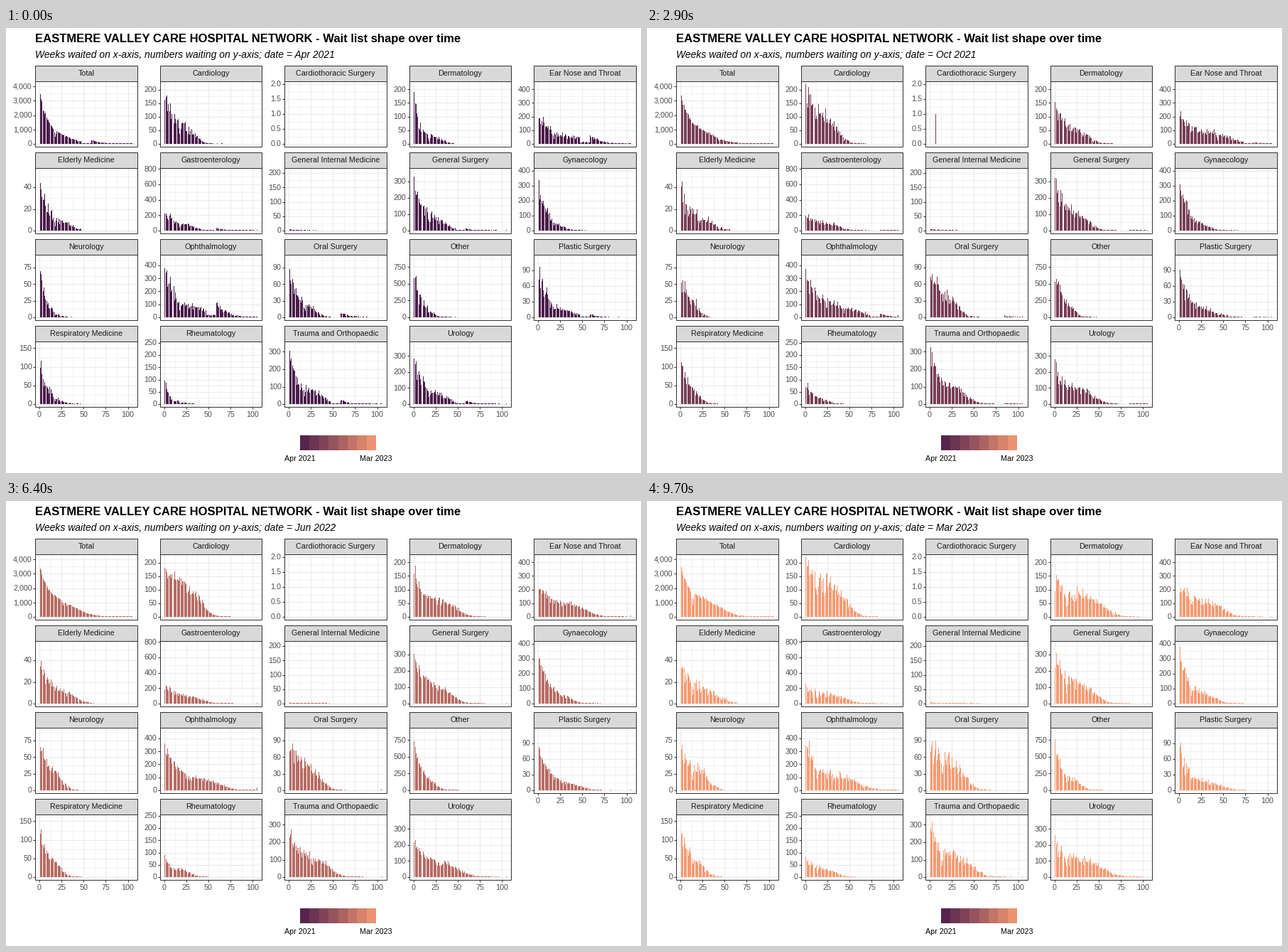
Animation, 894 px wide and 626 px high, one loop 10000 ms. Source, as a matplotlib script:

```python
import numpy as np
import matplotlib.pyplot as plt
from matplotlib.animation import FuncAnimation
from matplotlib.collections import LineCollection, PolyCollection
from matplotlib.patches import Rectangle

W, H, DPI = 894, 626, 100
PX = 72 / DPI
plt.rcParams["font.family"] = "Liberation Sans"

TITLE = "EASTMERE VALLEY CARE HOSPITAL NETWORK - Wait list shape over time"
SUBTITLE = "Weeks waited on x-axis, numbers waiting on y-axis; date = "
NAMES = "Jan Feb Mar Apr May Jun Jul Aug Sep Oct Nov Dec".split()
LAST = 23
MONTHS = [f"{NAMES[(m + 3) % 12]} {2021 + (m + 3) // 12}" for m in range(LAST + 1)]
# First frame at which each month stands still; the frame before is halfway.
STARTS = [0, 6, 11, 16] + list(range(21, 98, 4))

DARK, LIGHT = np.array([75, 29, 75]) / 255, np.array([246, 155, 115]) / 255
INK, AXIS_TEXT, STRIP, GRID = "#333333", "#4d4d4d", "#d9d9d9", "#ebebeb"

WEEKS = np.arange(1, 106)
WEEKS_PER_MONTH = 52.18 / 12
LOCKDOWN = 59  # weeks before the first month
rng = np.random.default_rng(11)
panels = []


def blend(t):
    return DARK + (LIGHT - DARK) * t


def referrals(age):
    """Relative referrals by age at the first month: noise, holidays, lockdown."""
    f = 1 + 0.15 * rng.standard_normal(age.size)
    for year in range(3):
        f *= 1 - 0.5 * np.exp(-((age - 18 + 52 * year) / 1.1) ** 2)
    f[(age > LOCKDOWN - 12) & (age < LOCKDOWN)] *= 0.35
    return np.clip(f, 0.1, None)


def waiting(peak, scale, share, limit, backlog):
    """A fast-treated part that decays, and a share that waits up to a limit."""
    age = np.arange(-105, 210)
    factor = referrals(age)
    old = np.where(age >= LOCKDOWN, np.exp((LOCKDOWN - age) / 10), 0)
    counts = np.zeros((LAST + 1, WEEKS.size))
    for t in range(LAST + 1):
        long = share[0] + (share[1] - share[0]) * np.sqrt(t / LAST)
        end = limit[0] + (limit[1] - limit[0]) * t / LAST
        quick = (1 - long) * np.exp(-(WEEKS - 1) / scale)
        slow = long / (1 + np.exp((WEEKS - end) * 7 / end))
        shift = round(WEEKS_PER_MONTH * t)
        left = peak * backlog * np.exp(-t / 5) * old
        v = peak * (quick + slow) + np.interp(WEEKS - shift, age, left)
        v *= np.interp(WEEKS - shift, age, factor)
        v += 0.4 * np.sqrt(v) * rng.standard_normal(WEEKS.size)
        v[-1] += left[age + shift > 105].sum() / 2
        counts[t] = np.clip(np.round(v), 0, None)
    return counts


def panel(name, ymax, step, peak=0, scale=1, share=(0, 0), limit=(1, 1), backlog=0):
    panels.append((name, ymax, step, waiting(peak, scale, share, limit, backlog)))


panel("Total", 4143, 1000)
panel("Cardiology", 220, 50, 180, 9, (0.35, 0.72), (35, 45))
panel("Cardiothoracic Surgery", 2, 0.5)
panel("Dermatology", 218.5, 50, 165, 6, (0.14, 0.48), (34, 55))
panel("Ear Nose and Throat", 437, 100, 225, 10, (0.22, 0.5), (62, 50), 0.12)
panel("Elderly Medicine", 55, 20, 40, 9, (0.18, 0.3), (36, 44))
panel("Gastroenterology", 775, 200, 230, 10, (0.3, 0.48), (36, 48), 0.14)
panel("General Internal Medicine", 207, 50, 4, 12, (0.1, 0.4), (20, 45))
panel("General Surgery", 364, 100, 280, 10, (0.22, 0.42), (38, 46), 0.04)
panel("Gynaecology", 398, 100, 310, 9, (0.06, 0.2), (30, 42))
panel("Neurology", 90, 25, 68, 6, (0.1, 0.5), (18, 32))
panel("Ophthalmology", 459, 100, 330, 12, (0.18, 0.3), (62, 62), 0.22)
panel("Oral Surgery", 108, 30, 82, 9, (0.22, 0.6), (30, 40), 0.1)
panel("Other", 891, 250, 720, 6, (0.15, 0.24), (22, 30))
panel("Plastic Surgery", 114, 30, 78, 11, (0.13, 0.16), (46, 50), 0.05)
panel("Respiratory Medicine", 160, 50, 112, 8, (0.1, 0.35), (22, 28))
panel("Rheumatology", 243, 50, 78, 6, (0.08, 0.45), (24, 35))
panel("Trauma and Orthopaedic", 342, 100, 285, 7, (0.26, 0.44), (40, 48), 0.07)
panel("Urology", 371, 100, 230, 9, (0.25, 0.46), (42, 56), 0.07)

# Rare cardiothoracic patients grow a month older each step until treated.
heart = panels[2][3]
for count, first, last in ((2, 2, 3), (1, 5, 12)):
    for t in range(first, last + 1):
        heart[t, round(2 + WEEKS_PER_MONTH * (t - first))] = count
panels[0][3][:] = sum(p[3] for p in panels[1:])

fig = plt.figure(figsize=(W / DPI, H / DPI), dpi=DPI, facecolor="white")
ax = fig.add_axes([0, 0, 1, 1])
ax.set(xlim=(0, W), ylim=(H, 0))
ax.axis("off")

PANEL_W, PANEL_H, STRIP_H = 143.7, 92.2, 22.2
UNIT_X, UNIT_Y = PANEL_W / 115.39, PANEL_H / 1.1


def label(x, y, text, size=10.7, color=AXIS_TEXT, ha="center", **kw):
    return ax.text(x, y, text, fontsize=size * PX, color=color, ha=ha,
                   va="baseline", **kw)


def lines(segments, color, width, z):
    ax.add_collection(LineCollection(segments, colors=color,
                                     linewidths=width * PX, zorder=z))


def box(x, y, w, h, face):
    ax.add_patch(Rectangle((x, y), w, h, facecolor=face, edgecolor=INK,
                           linewidth=PX, zorder=4))


major, minor, ticks = [], [], []
bar_left, bar_base, bar_height = [], [], []
for i, (name, ymax, step, data) in enumerate(panels):
    row, col = divmod(i, 5)
    left, strip_top = 41.2 + 175.5 * col, 52.8 + 122 * row
    top = strip_top + STRIP_H
    right, bottom = left + PANEL_W, top + PANEL_H
    zero_x, zero_y = left + 4.695 * UNIT_X, bottom - UNIT_Y * 0.05
    box(left, strip_top, PANEL_W, STRIP_H, STRIP)
    box(left, top, PANEL_W, PANEL_H, "none")
    label((left + right) / 2, strip_top + 14.6, name, 10.75, "#1a1a1a", zorder=5)

    for n, v in enumerate(np.arange(0, ymax * 1.05, step / 2)):
        y = zero_y - v / ymax * UNIT_Y
        (minor if n % 2 else major).append([(left, y), (right, y)])
        if n % 2 == 0:
            ticks.append([(left - 3, y), (left, y)])
            text = f"{v:.1f}" if step < 1 else f"{v:,.0f}"
            label(left - 4.6, y + 3.3, text, ha="right")

    for n, v in enumerate(np.arange(0, 101, 12.5)):
        x = zero_x + v * UNIT_X
        (minor if n % 2 else major).append([(x, top), (x, bottom)])
        if n % 2 == 0 and i >= 14:
            ticks.append([(x, bottom), (x, bottom + 3)])
            label(x, bottom + 14, f"{v:.0f}")

    bar_left.append(zero_x + (WEEKS - 0.4) * UNIT_X)
    bar_base.append(np.full(WEEKS.size, round(zero_y)))
    bar_height.append(np.minimum(data / ymax, 1) * UNIT_Y)

lines(minor, GRID, 0.6, 1)
lines(major, GRID, 1.1, 1)
lines(ticks, INK, 1, 4)

label(41, 20.3, TITLE, 16.6, "black", "left", weight="bold")
subtitle = label(41, 42.2, "", 13.9, "black", "left", style="italic")

for n in range(8):
    ax.add_patch(Rectangle((414 + 13.4 * n, 573), 13.4, 21, linewidth=0,
                           facecolor=blend((n + 0.5) / 8)))
label(413.8, 609, MONTHS[0], color="black")
label(521, 609, MONTHS[-1], color="black")

# Whole-pixel edges keep the bars and the gaps between them crisp.
raw_left = np.concatenate(bar_left)
x0, x1 = np.round(raw_left), np.round(raw_left + 0.8 * UNIT_X)
base = np.concatenate(bar_base)
heights = np.concatenate(bar_height, axis=1)
bars = PolyCollection([], linewidths=0, zorder=3)
ax.add_collection(bars, autolim=False)


def update(frame):
    month = int(np.searchsorted(STARTS, frame, "right")) - 1
    t, h = month, heights[month]
    if frame + 1 in STARTS:
        t, h = month + 0.5, (h + heights[month + 1]) / 2
    top = base - np.maximum(np.round(h), 1)
    quads = np.array([(x0, base), (x0, top), (x1, top), (x1, base)])
    bars.set_verts(quads.transpose(2, 0, 1)[h > 0])
    bars.set_facecolor(blend(t / LAST))
    subtitle.set_text(SUBTITLE + MONTHS[month])
    return bars, subtitle


anim = FuncAnimation(fig, update, frames=100, interval=100, repeat=True,
                     repeat_delay=0, blit=False)
plt.show()
```
